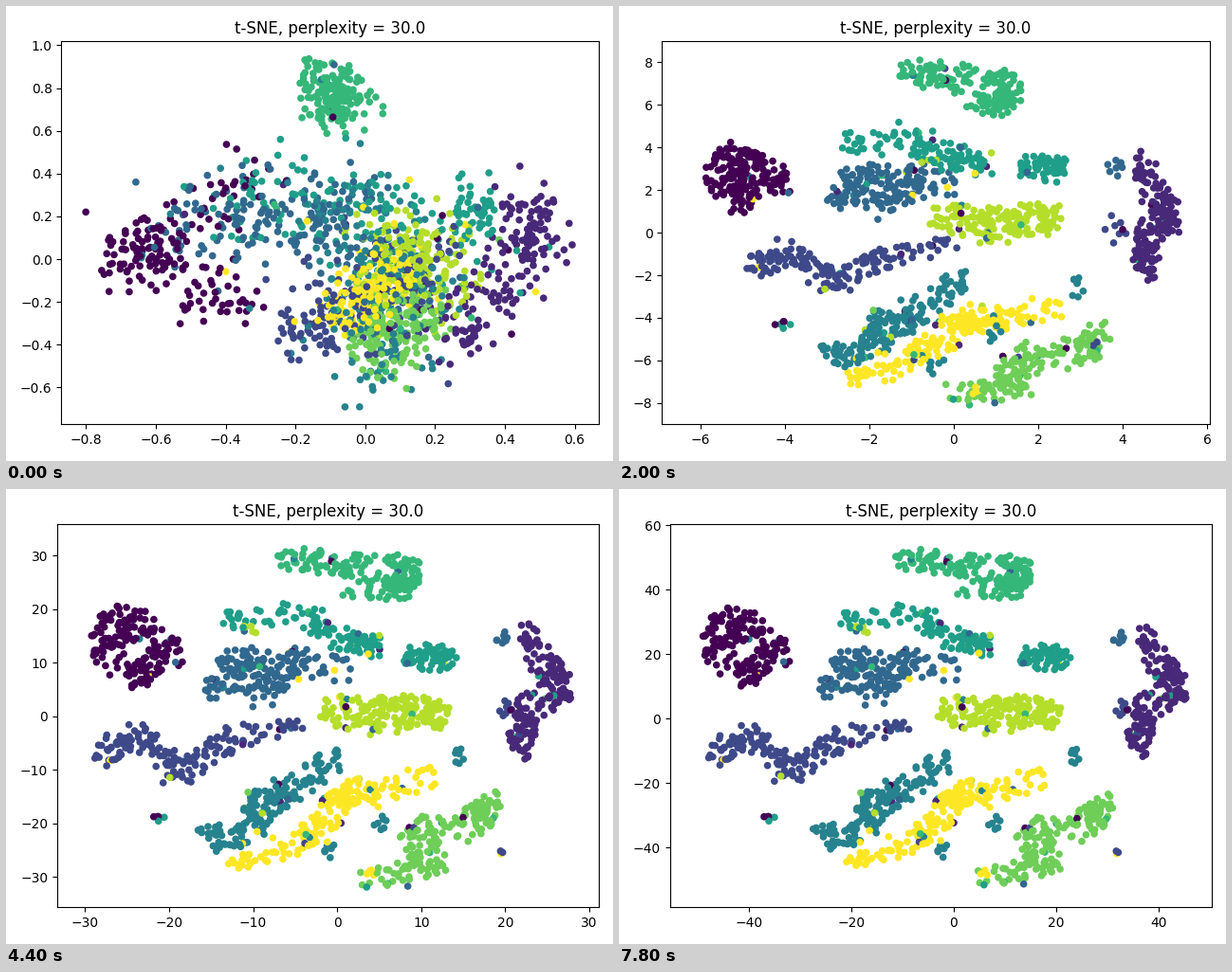
A matplotlib script that plays this animation: 640 by 480 pixels, repeating every 8000 ms.

```python
import numpy as np
import matplotlib.pyplot as plt
from matplotlib.animation import FuncAnimation

FRAMES, STEP = 40, 200
rng = np.random.default_rng(30)

# Axis limits (x0, x1, y0, y1) at a few frames
LIM_T = np.array([0, 3, 10, 18, 26, 31, 39])
LIMS = np.array([
    [-0.871, 0.669, -0.772, 1.018],
    [-5.161, 4.260, -5.033, 5.709],
    [-6.908, 6.056, -8.997, 8.975],
    [-26.07, 24.52, -28.19, 28.13],
    [-39.62, 36.68, -42.20, 42.61],
    [-46.37, 42.40, -49.20, 50.17],
    [-55.37, 50.37, -58.60, 60.30],
])

POS_T = np.array([0, 3, 10, 18, 39])
LEFT, RIGHT, TOP, BOTTOM = (58, 45, 45, 54, 54), 625, 35.5, 441

labels, places = [], []


def pchip(t, ts, ys):
    """Monotone cubic interpolation along the first axis."""
    h = np.diff(ts).reshape((-1,) + (1,) * (ys.ndim - 1))
    d = np.diff(ys, axis=0) / h
    prod, total = d[:-1] * d[1:], d[:-1] + d[1:]
    safe = np.where(prod > 0, total, 1)
    m = np.concatenate([d[:1], np.where(prod > 0, 2 * prod / safe, 0), d[-1:]])
    i = min(np.searchsorted(ts, t, side="right") - 1, len(ts) - 2)
    w = ts[i + 1] - ts[i]
    s = (t - ts[i]) / w
    return ((1 + 2 * s) * (1 - s) ** 2 * ys[i] + s * (1 - s) ** 2 * w * m[i]
            + s * s * (3 - 2 * s) * ys[i + 1] + s * s * (s - 1) * w * m[i + 1])


def trace(path, t, off):
    """Points along a path (radius, x, y, x, y, ...), thinner at its ends."""
    nodes = np.reshape(path[1:], (-1, 2))
    s = np.linspace(0, 1, len(nodes))
    line = np.column_stack([np.interp(t, s, col) for col in nodes.T])
    r = path[0] * (0.75 + 0.35 * np.sin(np.pi * t))
    return line + r[:, None] * off


def group(label, n, start, early, late):
    """Add n points of one digit, following one path per stage."""
    t = rng.uniform(size=n)
    ang = rng.uniform(0, 2 * np.pi, n)
    disc = np.sqrt(rng.uniform(size=n)) * np.array([np.cos(ang), np.sin(ang)])
    a = trace(start, t, rng.normal(0, 0.62, (n, 2)))
    b = trace(early, t, disc.T)
    d = trace(late, t, disc.T)
    c = 0.27 * b + 0.73 * d + rng.normal(0, 3, (n, 2))
    # Clusters tighten and drift apart a little at the end
    mid = d.mean(axis=0)
    e = mid + [(mid[0] - 340) * 0.022, 0] + (d - mid) * 0.95
    labels.extend([label] * n)
    places.append(np.array([a, b, c, d, e]))


group(0, 175, (32, 280, 160, 145, 258, 140, 262, 250, 325),
      (19, 157, 217, 120, 218, 84, 214),
      (18, 182, 177, 160, 158, 122, 131, 102, 165, 128, 202, 160, 185))
group(1, 172, (34, 562, 203, 545, 250, 470, 360),
      (8, 563, 205, 570, 255, 597, 290),
      (17, 553, 147, 563, 175, 583, 210, 542, 238, 546, 275))
group(2, 160, (38, 310, 332, 345, 325, 470, 265),
      (11, 248, 257, 322, 268, 445, 257),
      (17, 102, 281, 125, 260, 158, 268, 182, 300, 225, 266, 308, 250))
group(3, 170, (42, 170, 240, 285, 222, 390, 225),
      (20, 265, 178, 300, 178, 340, 188),
      (21, 215, 212, 245, 180, 270, 210, 290, 178, 365, 190))
group(4, 172, (55, 350, 215, 415, 275, 385, 385),
      (15, 245, 368, 310, 354, 402, 316),
      (18, 207, 370, 255, 362, 268, 330, 300, 318, 350, 283))
group(5, 112, (45, 235, 205, 330, 202, 420, 230),
      (19, 262, 163, 310, 160, 372, 162),
      (15, 235, 135, 318, 132, 360, 162, 395, 164))
group(5, 60, (32, 488, 220), (7, 433, 145, 472, 151),
      (15, 425, 173, 466, 178))
group(6, 178, (28, 335, 85, 355, 102),
      (9, 319, 56, 362, 70, 414, 101),
      (15, 282, 68, 340, 78, 425, 80, 425, 102, 362, 104))
group(7, 175, (35, 380, 358, 450, 325),
      (12, 280, 398, 385, 413, 510, 390),
      (18, 372, 414, 450, 398, 430, 365, 490, 352, 515, 330))
group(8, 168, (42, 465, 285, 400, 260),
      (10, 335, 186, 385, 208, 440, 207, 457, 180),
      (20, 340, 230, 380, 240, 425, 232, 460, 238))
group(9, 170, (28, 352, 325, 422, 275),
      (11, 262, 378, 375, 356, 500, 361),
      (17, 242, 388, 315, 375, 340, 348, 360, 320, 395, 320, 460, 298))

# Small islands: digit, count, early and late centre
for label, n, *spot in [
    (0, 3, 196, 304, 157, 344),
    (5, 3, 211, 311, 164, 347),
    (2, 8, 523, 239, 525, 228),
    (2, 3, 461, 281, 520, 380),
    (4, 8, 512, 333, 480, 282),
    (4, 7, 405, 320, 395, 352),
    (4, 7, 320, 380, 343, 383),
    (3, 8, 537, 200, 525, 158),
    (8, 6, 530, 207, 258, 146),
    (9, 4, 360, 405, 385, 405),
]:
    group(label, n, (60, 420, 290), (4 + n, *spot[:2]), (2 + n, *spot[2:]))

# Some points of each cluster are other digits
labels = np.array(labels)
homes = labels.copy()
for home in range(10):
    n = 4 if home in (0, 6) else 9
    odd = rng.choice(np.flatnonzero(homes == home), n, replace=False)
    labels[odd] = (home + rng.integers(1, 10, n)) % 10

# Stage pixels become fractions of the axes, y upwards
pos = np.concatenate(places, axis=1)
left = np.array(LEFT)[:, None]
pos[..., 0] = (pos[..., 0] - left) / (RIGHT - left)
pos[..., 1] = (BOTTOM - pos[..., 1]) / (BOTTOM - TOP)
pos = np.clip(pos, 0.0455, 0.9545)

order = rng.permutation(len(labels))
pos, labels = pos[:, order], labels[order]

fig, ax = plt.subplots(figsize=(6.4, 4.8), dpi=100)
dots = ax.scatter(pos[0, :, 0], pos[0, :, 1], s=20, c=labels, cmap="viridis",
                  vmin=0, vmax=9)
ax.set_title("t-SNE, perplexity = 30.0")


def update(i):
    x0, x1, y0, y1 = pchip(i, LIM_T, LIMS)
    low, size = np.array([x0, y0]), np.array([x1 - x0, y1 - y0])
    dots.set_offsets(low + pchip(i, POS_T, pos) * size)
    ax.set_xlim(x0, x1)
    ax.set_ylim(y0, y1)
    fig.subplots_adjust(left=0.125, right=0.9, bottom=0.11, top=0.88)
    fig.tight_layout()
    return dots,


anim = FuncAnimation(fig, update, frames=FRAMES, interval=STEP, repeat=True,
                     repeat_delay=0, init_func=lambda: update(0))
plt.show()
```
